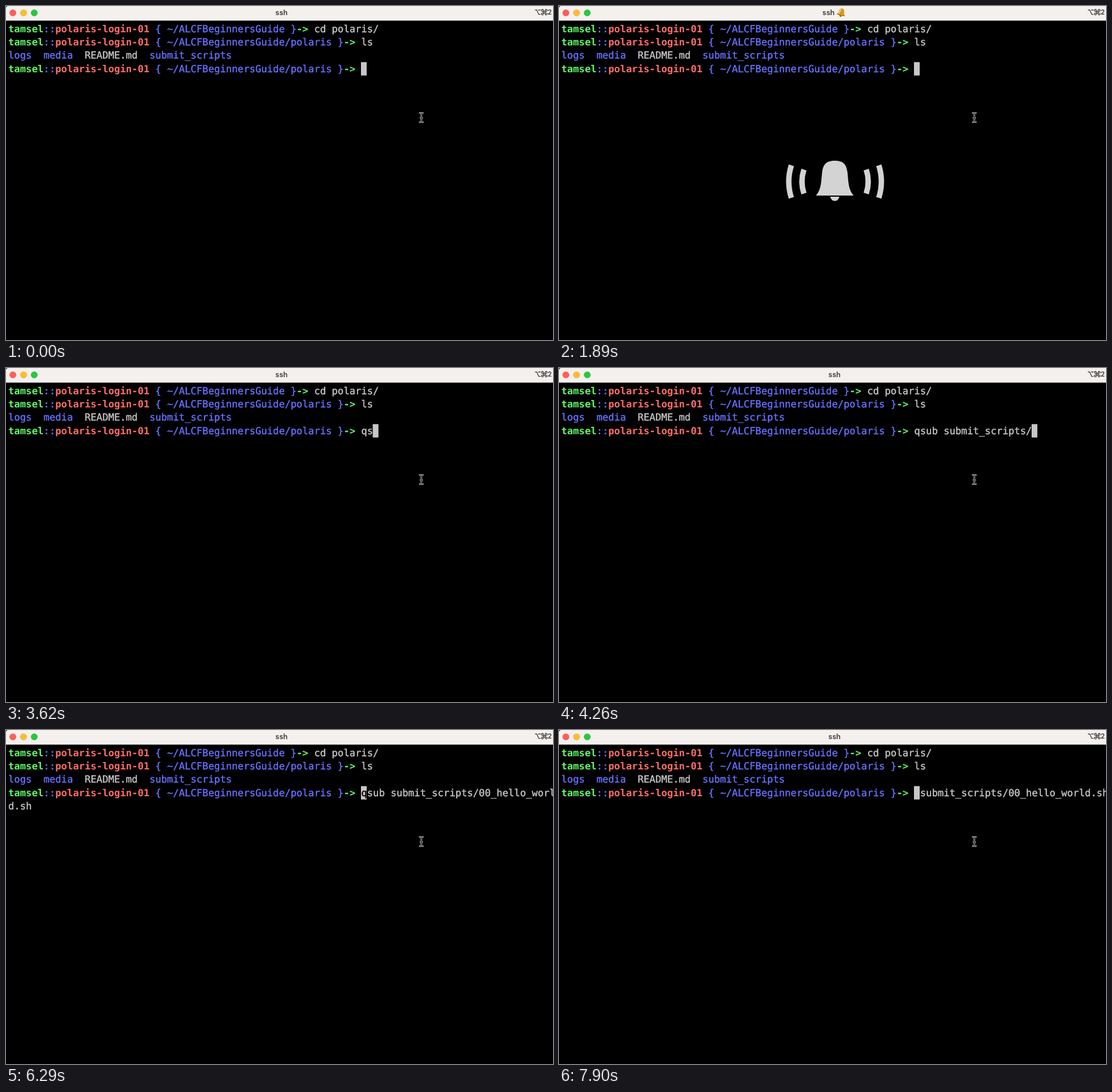
These frames come from a looping animation (957x585 px, 8 s). An HTML page:

```html
<!DOCTYPE html>
<html lang="en">
<head>
<meta charset="utf-8">
<title>ssh</title>
<style>
  html, body { margin: 0; width: 100%; height: 100%; overflow: hidden; background: #000; }
  svg { display: block; width: 957px; height: 585px; }
  #term text { font: 17.1px "DejaVu Sans Mono", monospace; text-rendering: geometricPrecision; stroke-width: 0.4px; }
  #term .b { font-weight: bold; stroke-width: 0; }
  .title { font: 600 12.5px Inter, sans-serif; fill: #3c3a39; }
  .keys { font: 600 12px Inter, sans-serif; fill: #3c3a39; }
  .sym { fill: none; stroke: #3c3a39; stroke-width: 1.3; }
</style>
</head>
<body>
<svg viewBox="0 0 957 585">
  <rect width="957" height="585"/>
  <rect width="957" height="25.6" fill="#f4f0ed"/>
  <path d="M0 0H4Q0 0 0 4Z"/>
  <g stroke-width="0.6">
    <circle cx="12" cy="12" r="5.6" fill="#ff5f57" stroke="#e2574f"/>
    <circle cx="30.7" cy="12" r="5.6" fill="#febc2e" stroke="#e0a63a"/>
    <circle cx="49.4" cy="12" r="5.6" fill="#28c840" stroke="#2bb141"/>
  </g>

  <text id="title" class="title" y="16.3" text-anchor="middle">ssh</text>
  <g id="badge" transform="translate(494 11.5) rotate(14)">
    <ellipse cx="0" cy="5.6" rx="2" ry="1.9" fill="#8a5a10"/>
    <path d="M0-7.2C3-7.2 4.3-5 4.6-1.8C4.8 1 5.6 2.4 7.2 3.6Q7.6 5.4 0 5.4T-7.2 3.6C-5.6 2.4-4.8 1-4.6-1.8C-4.3-5-3-7.2 0-7.2Z" fill="#d99a1c"/>
    <path d="M-1.6-5.5C-3.2-4-2.6 0-4.4 3" fill="none" stroke="#f8dc78" stroke-width="1.6"/>
    <path d="M-6.6 3.9Q0 5.8 6.6 3.9" fill="none" stroke="#8f5c12" stroke-width="1"/>
  </g>

  <g transform="translate(0 -0.8)">
    <path class="sym" d="M925.5 7.8H928.6L932 15.4H935.2M931 7.8H935.2"/>
    <path class="sym" d="M940.2 9.9V8.5A1.7 1.7 0 1 0 938.5 10.2H945A1.7 1.7 0 1 0 943.3 8.5V14.8A1.7 1.7 0 1 0 945 13.1H938.5A1.7 1.7 0 1 0 940.2 14.8Z"/>
    <text class="keys" x="947.4" y="16">2</text>
  </g>

  <g id="term"></g>

  <g id="bell" fill="#d3d3d3">
    <path d="M482.5 271C497 271 502.5 277 504.5 290C506.5 306 505.5 321 515.5 332H449.5C459.5 321 458.5 306 460.5 290C462.5 277 468 271 482.5 271Z"/>
    <path d="M474.5 334H490.5Q488.5 341.5 482.5 341.5T474.5 334Z"/>
    <g fill="none" stroke="#d3d3d3" stroke-width="9.5">
      <path d="M406.5 279Q397.5 307.5 406.5 336"/>
      <path d="M428.5 286.5Q421.5 307.5 428.5 328.5"/>
      <path d="M537.5 286.5Q544.5 307.5 537.5 328.5"/>
      <path d="M559.5 279Q568.5 307.5 559.5 336"/>
    </g>
  </g>

  <defs>
    <path id="beam" d="M723.8 187.4Q726.6 187.4 726.6 190Q726.6 187.4 729.4 187.4M726.6 190V201M725 196.3H728.2M723.8 203.4Q726.6 203.4 726.6 200.8Q726.6 203.4 729.4 203.4"/>
  </defs>
  <g fill="none" stroke-linecap="round">
    <use href="#beam" stroke="#d0d0d0" stroke-width="2.6"/>
    <use href="#beam" stroke="#000" stroke-width="1"/>
  </g>
</svg>
<script>
const NS = 'http://www.w3.org/2000/svg';
const CELL = 10.292, LEFT = 4, ROW = 23.4, TOP = 28.1, BASE = 17.5, COLS = 93, START = 60, LOOP = 8000;
const GREEN = '#5ffa68', RED = '#ff6e67', BLUE = '#6871ff', GREY = '#c7c7c7';
const $ = id => document.getElementById(id);
const colX = col => LEFT + col * CELL;
const rowY = row => TOP + row * ROW;

function add(parent, tag, attrs, text = '') {
  const el = document.createElementNS(NS, tag);
  for (const key in attrs) el.setAttribute(key, attrs[key]);
  el.textContent = text;
  return parent.appendChild(el);
}

// Places each word on the character grid; returns the column after the text.
function put(parent, row, col, text, color, bold) {
  for (const m of text.matchAll(/\S+/g)) {
    add(parent, 'text', {
      x: colX(col + m.index), y: rowY(row) + BASE, fill: color, stroke: color, class: bold ? 'b' : ''
    }, m[0]);
  }
  return col + text.length;
}

function prompt(row, path, command) {
  let col = put(term, row, 0, 'tamsel', GREEN, true);
  col = put(term, row, col, '::', BLUE);
  col = put(term, row, col, 'polaris-login-01', RED, true);
  col = put(term, row, col, ` { ${path} }`, BLUE);
  col = put(term, row, col, '->', GREEN, true);
  put(term, row, col + 1, command, GREY);
}

const term = $('term');
prompt(0, '~/ALCFBeginnersGuide', 'cd polaris/');
prompt(1, '~/ALCFBeginnersGuide/polaris', 'ls');
put(term, 2, 0, 'logs  media', BLUE);
put(term, 2, 13, 'README.md', GREY);
put(term, 2, 24, 'submit_scripts', BLUE);
prompt(3, '~/ALCFBeginnersGuide/polaris', '');
const line = add(term, 'g', {});

// Edits to the command line: [time, text, cursor offset (default: end)]
const dir = ' submit_scripts/', file = dir + '00_hello_world.sh ';
const edits = [
  [0, ''], [770, 'q'], [830, 'qs'], [890, 'qsu'],
  [1490, 'qs'], [1600, 'q'], [1780, ''],
  [3380, 'q'], [3620, 'qs'], [3730, 'qsu'], [3840, 'qsub'], [3940, 'qsub '],
  [4050, 'qsub s'], [4160, 'qsub su'], [4260, 'qsub' + dir],
  [4800, 'qsub' + dir + '0'], [4980, 'qsub' + dir + '00'], [5090, 'qsub' + file],
  [6290, 'qsub' + file, 0], [6710, 'qsub' + file, 1], [6950, 'qsub' + file, 2],
  [7070, 'qsub' + file, 3], [7240, 'qsub' + file, 4],
  [7480, 'qsu' + file, 3], [7660, 'qs' + file, 2], [7780, 'q' + file, 1], [7900, file, 0]
];
const BELL_ON = 1830, BELL_OFF = 3380;
const fades = [BELL_ON, 1890, 1950, 2010, 2060, 2120];

function drawLine([, text, at = text.length]) {
  line.replaceChildren();
  const room = COLS - START;
  put(line, 3, START, text.slice(0, room), GREY);
  put(line, 4, 0, text.slice(room), GREY);
  const pos = START + at, row = 3 + Math.floor(pos / COLS), col = pos % COLS;
  add(line, 'rect', { x: colX(col) - 0.5, y: rowY(row), width: 10, height: ROW, fill: GREY });
  put(line, row, col, text[at] || '', '#000');
}

let shown;
function frame(now) {
  const t = now % LOOP;
  const edit = edits.findLast(e => e[0] <= t);
  if (edit !== shown) drawLine(shown = edit);

  const ringing = t >= BELL_ON && t < BELL_OFF;
  const step = fades.findLast(f => f <= t);
  $('bell').setAttribute('opacity', ringing ? Math.min(1, 1 - (step - 1890) / 245) : 0);
  $('badge').setAttribute('opacity', ringing ? 1 : 0);
  $('title').setAttribute('x', ringing ? 471.5 : 482);
  requestAnimationFrame(frame);
}
frame(0);
requestAnimationFrame(frame);
</script>
</body>
</html>
```
